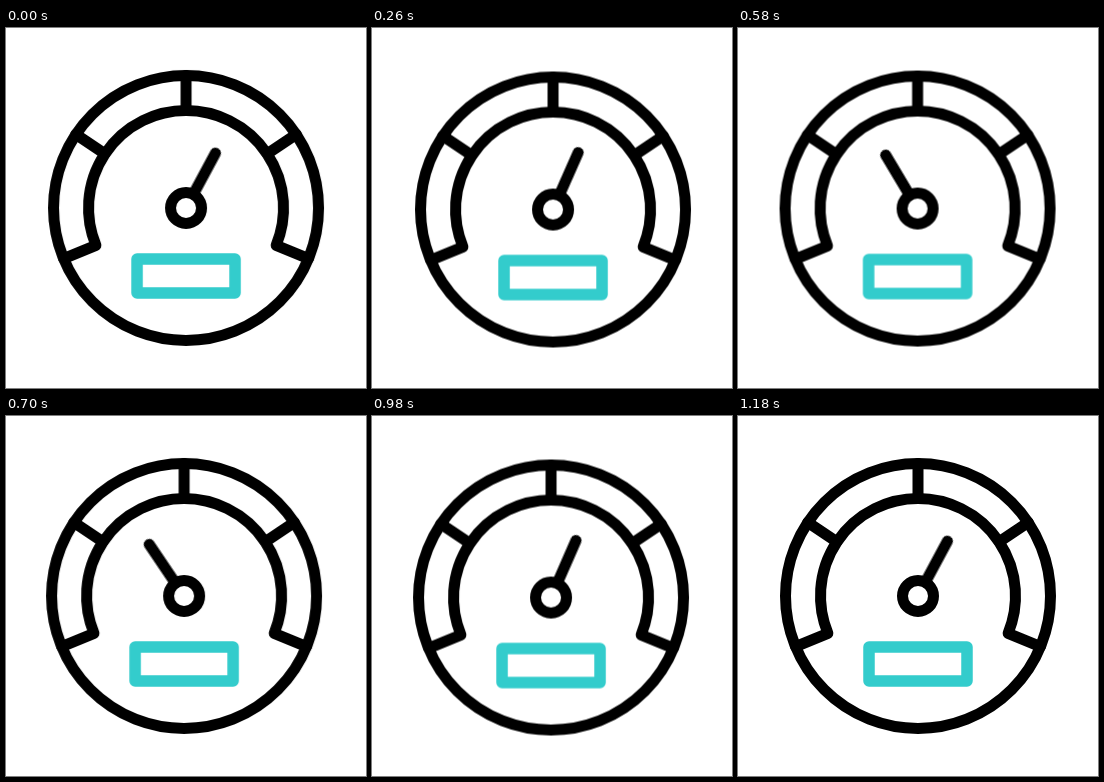
An HTML page for the animation above (1200 ms loop, 360x360 px).

```html
<!DOCTYPE html>
<html lang="en">
<head>
<meta charset="utf-8">
<title>Gauge</title>
<style>
  html, body { margin: 0; width: 100%; height: 100%; overflow: hidden; background: #fff; }
  svg { display: block; width: 100vw; height: 100vh; }
  .line { fill: none; stroke: #000; stroke-width: 11; stroke-linecap: round; stroke-linejoin: round; }
  .panel { stroke: #33cccc; stroke-width: 11.5; }
  .shake { animation: shake 1.2s linear infinite; }
  .needle { animation: swing 1.2s linear infinite; }

  @keyframes shake {
    0%      { transform: translate(0, 0); }
    6.67%   { transform: translate(3px, -2px); }
    15%     { transform: translate(-4px, 2px); }
    21.67%  { transform: translate(1px, 1.5px); }
    30%     { transform: translate(3px, 3px); }
    36.67%  { transform: translate(1px, 1px); }
    45%     { transform: translate(-4px, -2px); }
    51.67%  { transform: translate(3px, 3px); }
    58.33%  { transform: translate(-2px, 0); }
    65%     { transform: translate(3px, -2px); }
    71.67%  { transform: translate(-.5px, -.5px); }
    76.67%  { transform: translate(-3px, -1px); }
    81.67%  { transform: translate(-1px, 1.5px); }
    86.67%  { transform: translate(2px, 3px); }
    91.67%  { transform: translate(-3.5px, -1px); }
    98.33%, 100% { transform: translate(0, 0); }
  }

  @keyframes swing {
    0%     { transform: rotate(28.2deg); animation-timing-function: cubic-bezier(.6, 0, .9, .5); }
    21.67% { transform: rotate(24deg); }
    36.67% { transform: rotate(-11deg); animation-timing-function: cubic-bezier(.2, .6, .5, 1); }
    58.33% { transform: rotate(-34deg); animation-timing-function: cubic-bezier(.5, 0, .9, .5); }
    71.67% { transform: rotate(-26deg); }
    81.67% { transform: rotate(23.5deg); animation-timing-function: cubic-bezier(.1, .6, .4, 1); }
    98.33%, 100% { transform: rotate(28.2deg); }
  }
</style>
</head>
<body>
<svg viewBox="0 0 360 360">
  <g transform="translate(180 180)">
    <g class="shake">
      <circle class="line" r="132.5"/>
      <path class="line" d="M-122.4 50.7 L-90.1 37.3 A97.5 97.5 0 1 1 90.1 37.3 L122.4 50.7"/>
      <path class="line" d="M0 -132.5 V-97.5 M-110.2 -73.6 L-81.1 -54.2 M110.2 -73.6 L81.1 -54.2"/>
      <rect class="line panel" x="-49" y="51" width="98" height="34"/>
      <circle class="line" r="15.5"/>
      <path class="line needle" d="M0 -16 V-62.3"/>
    </g>
  </g>
</svg>
</body>
</html>
```
